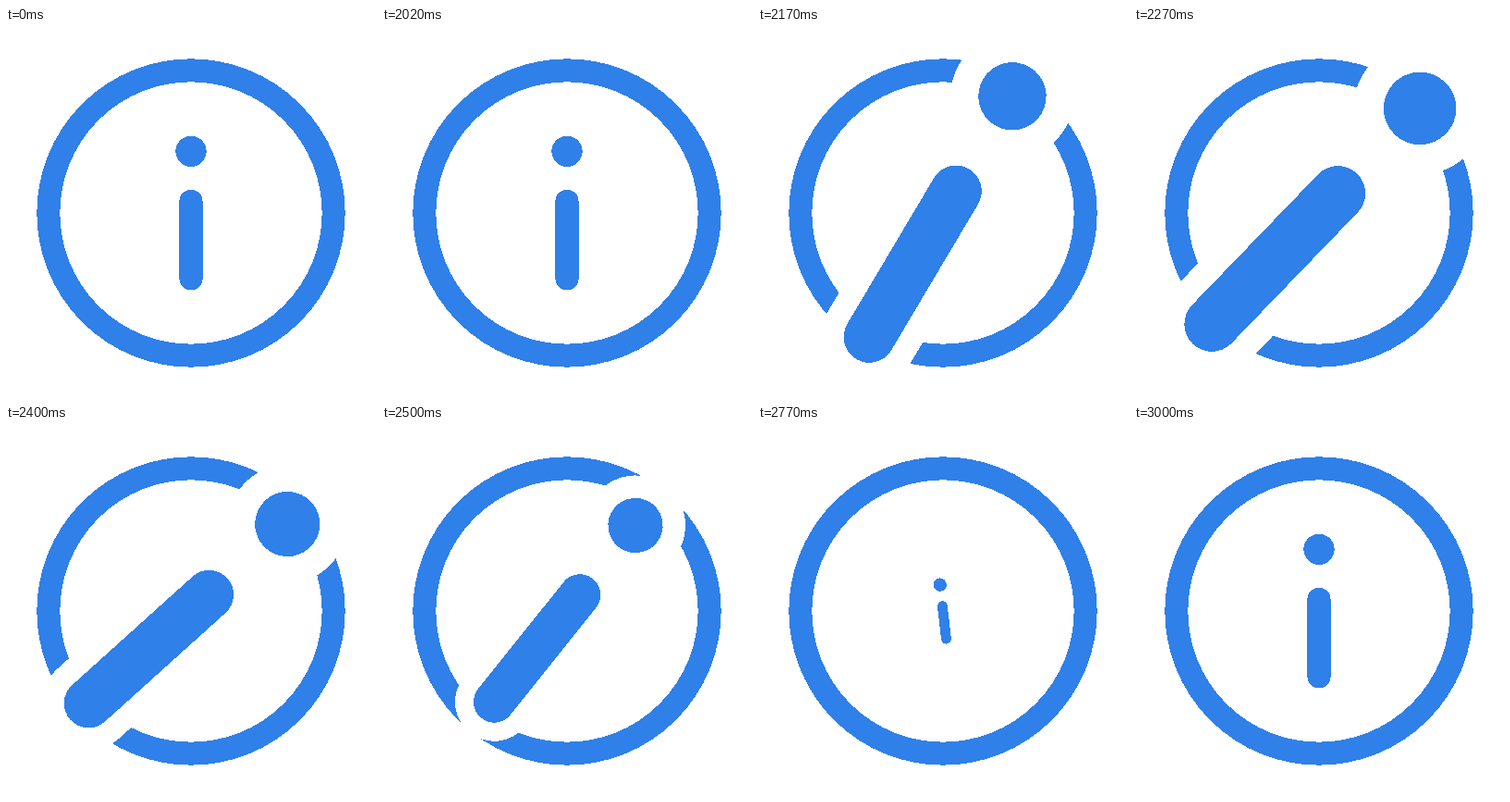
An HTML page for the animation above (3.02 s loop, 400x400 px).

```html
<!DOCTYPE html>
<html lang="en">
<head>
<meta charset="utf-8">
<title>Info icon</title>
<style>
  html, body { margin: 0; width: 100%; height: 100%; overflow: hidden; background: #fff; }
  svg { display: block; width: 100vw; height: 100vh; color: #2f80e8; }
</style>
</head>
<body>
<svg viewBox="-200 -200 400 400" fill="none" stroke="currentColor" stroke-width="25"
     stroke-linecap="round" shape-rendering="crispEdges">
  <circle r="154.17"/>
  <g id="mark">
    <!-- white halo that cuts the ring -->
    <circle cy="-66.67" r="30.4" fill="#fff" stroke="none"/>
    <path d="M0-12.5V70.83" stroke="#fff" stroke-width="47.8"/>
    <circle cy="-66.67" r="16.67" fill="currentColor" stroke="none"/>
    <path d="M0-12.5V70.83" stroke-width="25.2"/>
  </g>
</svg>
<script>
  const LOOP = 3020, STEP = 25;
  const OUT = 2030, BACK = 2500, END = 3000;
  const TILT = 38.66, GROWTH = 0.777;
  const mark = document.getElementById('mark');

  const progress = (t, from, to) => Math.min(1, Math.max(0, (t - from) / (to - from)));

  // Eases 0 to 1 with an overshoot; a larger kick starts faster and swings further
  function spring(u, kick) {
    const w = 1 - u;
    return u ** 3 + 4.9 * u * u * w + kick * u * w * w;
  }

  function draw(now) {
    const t = Math.floor((now % LOOP + 5) / STEP) * STEP;
    const out = progress(t, OUT, BACK), back = progress(t, BACK, END);
    const swing = kick => spring(out, kick) - spring(back, kick);
    mark.setAttribute('transform',
      `rotate(${TILT * swing(3)}) scale(${1 + GROWTH * swing(8.1)})`);
  }

  const start = performance.now();
  (function tick() {
    draw(performance.now() - start);
    requestAnimationFrame(tick);
  })();
</script>
</body>
</html>
```
